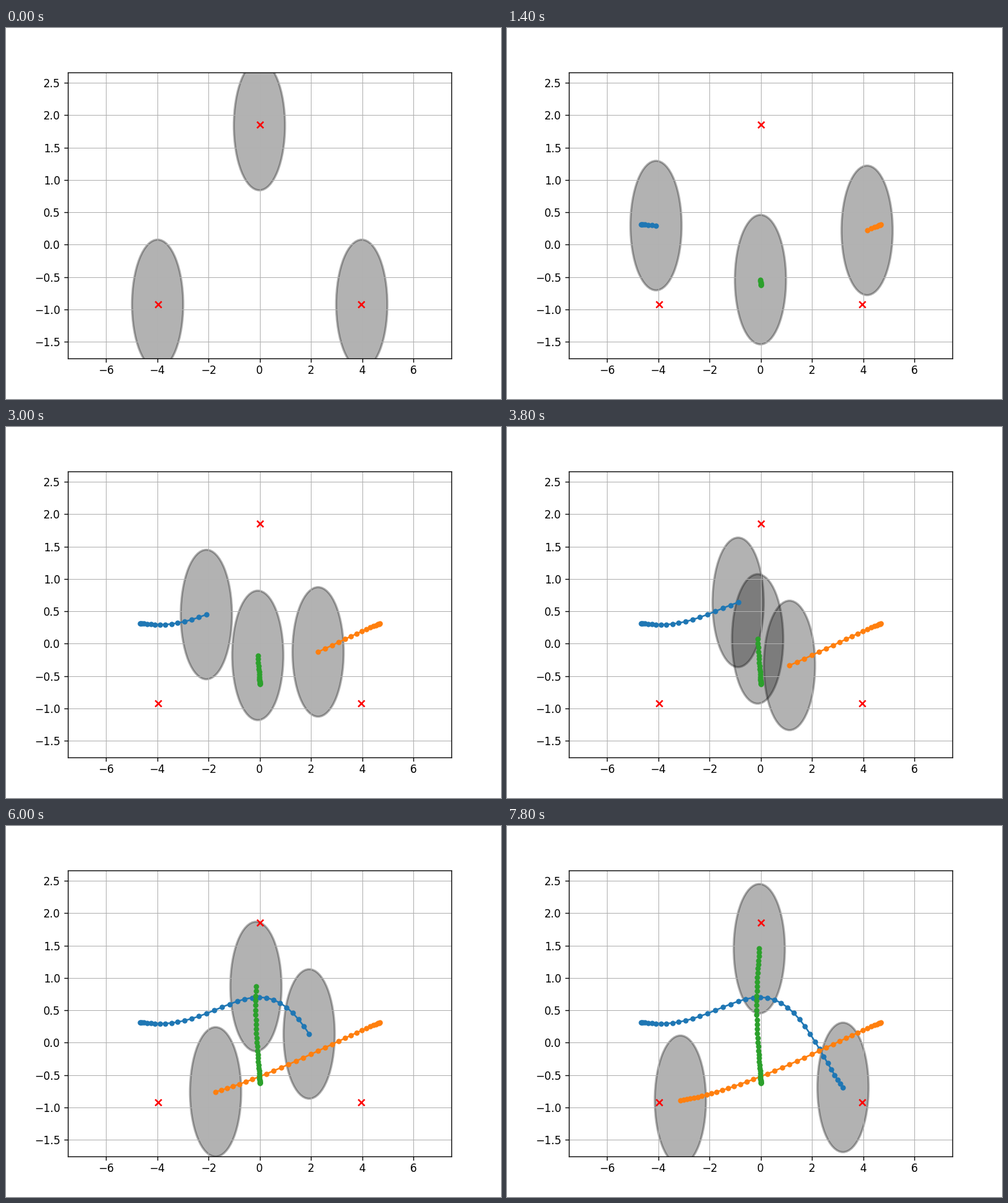
These frames come from a looping animation (768 px wide and 576 px high, 8 s). A matplotlib script:

```python
import numpy as np
import matplotlib.pyplot as plt
from matplotlib.animation import FuncAnimation
from matplotlib.patches import Circle

FRAMES, STEP_MS = 40, 200
WIDTH, HEIGHT, DPI = 768, 576, 120

GOALS = np.array([(-3.96, -0.921), (3.96, -0.921), (0, 1.854)])
PARKED = [(-3.985, -0.922), (3.985, -0.922), (-0.01, 1.84)]

steps = np.arange(FRAMES - 1)


def surge(start, aim, tau, power):
    """Speed up from rest, then settle towards the aim."""
    return start + (aim - start) * (1 - np.exp(-(steps / tau) ** power))


def dodge(height, peak, width):
    """Swerve aside and come back."""
    return height * np.exp(-((steps - peak) / width) ** 2 / 2)


blue = (surge(-4.669, 3.985, 24, 1.92),
        surge(0.3085, -0.921, 24, 1.92) + dodge(1.094, 22.9, 7.2))
orange = (surge(4.684, -4.116, 25.3, 1.93),
          surge(0.3085, -0.925, 20.8, 2.1))
green = (0.015 + dodge(-0.176, 25, 9.5),
         surge(-0.6264, 2.357, 34.8, 2))
paths = [np.column_stack(p) for p in (blue, orange, green)]

fig, ax = plt.subplots(figsize=(WIDTH / DPI, HEIGHT / DPI), dpi=DPI)
ax.set_xlim(-7.487, 7.487)
ax.set_ylim(-1.7527, 2.6587)
ax.grid(True, lw=0.6)
ax.tick_params(axis="x", pad=2.9)
ax.plot(*GOALS.T, "rx", mew=1.5)

bodies = [ax.add_patch(Circle(p, 1, color="k", alpha=0.3, lw=2)) for p in PARKED]
trails = [ax.plot([], [], "-o", color=c, ms=4)[0] for c in ("C0", "C1", "C2")]


def draw(n):
    for body, trail, path, home in zip(bodies, trails, paths, PARKED):
        trail.set_data(path[:n, 0], path[:n, 1])
        body.center = path[n - 1] if n else home
    return bodies + trails


anim = FuncAnimation(fig, draw, frames=FRAMES, interval=STEP_MS,
                     repeat=True, repeat_delay=0)
plt.show()
```
